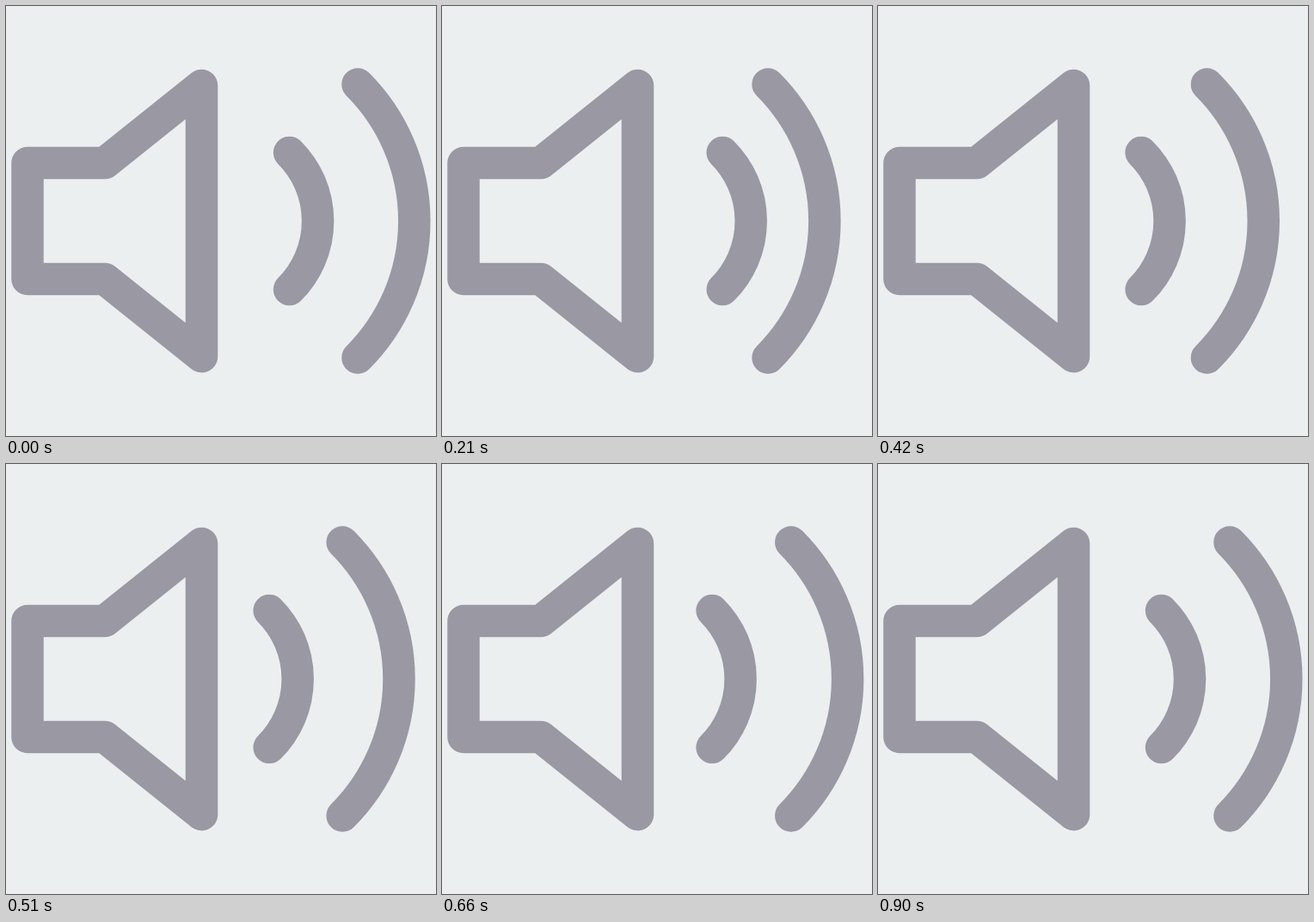
Animation of 500 by 500 pixels, one loop 1830 ms. Source, as an HTML page:

```html
<!DOCTYPE html>
<html>
<head>
<meta charset="utf-8">
<style>
  html, body { margin: 0; width: 100%; height: 100%; overflow: hidden; background: #ebeff0; }
  svg { display: block; width: 100%; height: 100%; }
</style>
</head>
<body>
<svg viewBox="0 0 500 500" fill="none" stroke="#9998a3" stroke-width="37.5" stroke-linecap="round" stroke-linejoin="round">
  <path d="M227.5 92.5 115 182.5H25v135h90l112.5 90z"/>
  <path id="inner" d="M329.6 170.4a112.5 112.5 0 0 1 0 159.2"/>
  <path id="outer" d="M409 91a225 225 0 0 1 0 318"/>
</svg>
<script>
  const LOOP = 1830, STEP = 30, END = 900;

  const ease = (t, from, to) => {
    const u = Math.min(1, Math.max(0, (t - from) / (to - from)));
    return u * u * (3 - 2 * u);
  };

  // Slide left, pause, then return more slowly.
  const waves = [
    { el: document.getElementById('outer'), dist: 31.25, out: [0, 240], back: [315, 745] },
    { el: document.getElementById('inner'), dist: 23.5, out: [153, 393], back: [497, 912] }
  ];

  function draw(now) {
    const t = Math.min(END, Math.floor((now % LOOP) / STEP) * STEP);
    for (const { el, dist, out, back } of waves) {
      const x = dist * (ease(t, ...back) - ease(t, ...out));
      el.setAttribute('transform', `translate(${x} 0)`);
    }
  }

  const start = performance.now();
  function tick() {
    draw(performance.now() - start);
    requestAnimationFrame(tick);
  }
  tick();
</script>
</body>
</html>
```
